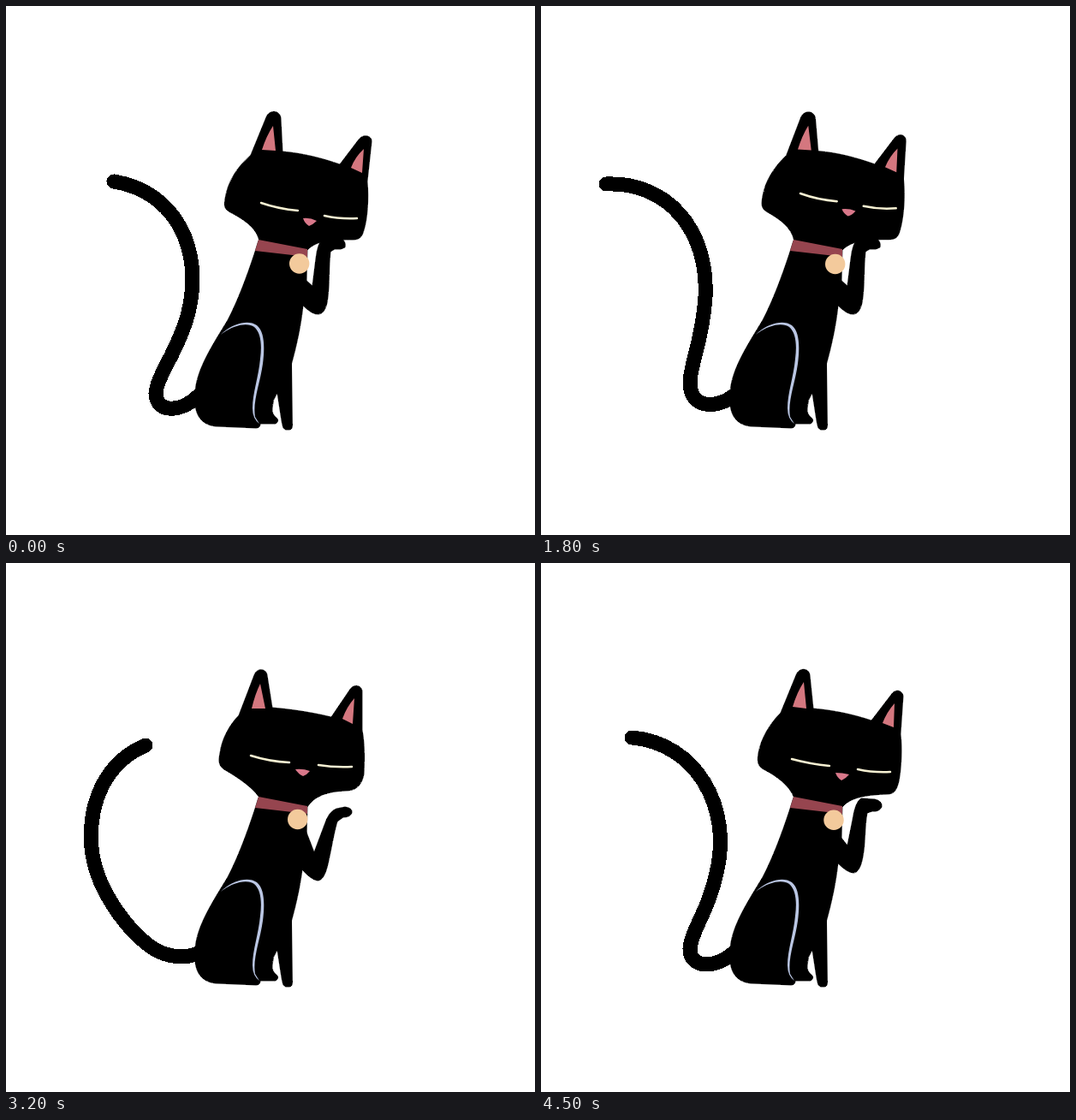
Recreate the animation shown at these times as an HTML page without scripts. Size 618 by 618 pixels, loop 4.6 s.

```html
<!DOCTYPE html>
<html lang="en">
<head>
<meta charset="utf-8">
<title>Cat washing its face</title>
<style>
html, body { margin: 0; width: 100%; height: 100%; overflow: hidden; background: #fff; }
svg { display: block; width: 100vw; height: 100vh; }
.fur { stroke: #000; stroke-width: .8; stroke-linejoin: round; shape-rendering: crispEdges; }

/* Each part holds its own shape for every pose; the keyframes pick the pose. */
.tail {
  fill: none; stroke-width: 17; stroke-linecap: round;
  --rest: path("M224 456C204 475 176 476 175 453C176 432 200 405 212 362C233 283 196 216 126 205");
  --hook: path("M224 456C206 466 183 464 172 441C148 394 172 352 198 302C224 268 220 212 173 202");
  --right: path("M224 456C206 465 181 462 166 441C144 409 138 366 149 317C164 278 192 230 184 207");
  --bow: path("M224 456C206 464 180 460 160 441C140 424 104 380 100 332C96 283 114 234 163 213");
  --bend: path("M224 456C204 470 180 468 172 442C163 412 148 382 126 355C78 302 62 240 126 211");
  --flick: path("M224 456C204 472 172 472 172 440C173 420 179 400 178 365C176 250 98 265 61 211");
  --left: path("M224 456C204 472 172 471 172 439C173 419 182 396 182 358C182 262 105 240 53 210");
  --back: path("M224 456C204 471 174 470 174 440C174 420 189 390 192 340C196 262 148 205 76 208");
  --near: path("M224 456C204 474 174 474 174 451C175 430 196 406 205 362C224 284 180 210 106 204");
  animation: sway 4.6s infinite;
}
.body {
  --rest: path("M295 274L290 290C281 317 271 344 259 367C242 395 222 425 221 452C219 475 226 489 245 491L292 493Q297 493 297 488L315 488Q319 486 317 482Q310 477 311 470Q311 460 317 452L321 478C322 485 323 490 324 493Q326 496 331 495Q335 495 334.5 488L333.5 418C340 395 345 370 347 350L351 322L352 284Z");
  --sit: path("M291 274L287 290C278 317 269 344 258 367C242 395 222 425 221 452C219 475 226 489 245 491L292 493Q297 493 297 488L315 488Q319 486 317 482Q310 477 311 470Q311 460 316 452L320 478C321 485 322 490 323 493Q325 496 331 495Q334 495 334 488L331 418C334 408 344 385 345 350L346 322L349 284Z");
}
.arm {
  --rest: path("M350 320L358 327L362 295Q364 277 370 272L390 270Q398 275 396 282Q392 285 384 284L379 287C377 305 378 325 376 340C375 352 371 360 365 360Q358 361 346 349Z");
  --lift: path("M350 312L360 338L372 306Q377 290 386 287L396 285Q405 286 404 292Q402 297 394 297L387 302C383 315 380 335 376 352C373 365 369 371 364 371Q356 370 345 357Z");
  --reach: path("M348 320L356 360L375 375Q384 390 390 402L396 412Q398 420 390 420Q384 419 380 412L372 402C366 396 362 395 358 392C350 388 347 385 344 380Q343 370 344 345Z");
  --sit: path("M346 320L333 411L340 430Q343 450 343 470L343 484Q344 491 349 490Q354 490 353 484L354 470C355 455 356 440 356 428C355 415 351 395 349 380Q346 360 345 330Z");
  --near: path("M350 320L358 330L364 300Q367 279 374 275L390 276Q399 278 398 285Q395 291 387 290L381 292C378 308 379 328 376 343C374 355 370 362 365 362Q358 362 346 350Z");
  animation: wash 4.6s infinite;
}
.head {
  --rest: path("M296 275C293 258 275 248 262 241C254 237 255 232 256 225C259 205 270 188 286 174L304 130C307 121 320 121 321 131L323 170C347 172 370 178 390 185L412 156C417 149 428 151 427 159L422 205C424 225 422 250 418 262C416 270 413 273 405 273C385 273 365 272 352 285Z");
  --mid: path("M296 275C293 258 277 248 264 241C256 237 257 232 258 225C261 205 272 188 288 174L306 130C309 121 322 121 323 131L325 170C349 172 371 178 391 185L412 156C417 149 428 150 427 158L423 205C425 225 423 250 419 262C417 271 414 274 406 274C386 274 365 272 352 285Z");
  --down: path("M296 275C293 257 277 248 264 242C256 238 257 234 258 227C261 207 273 190 289 175L308 132C311 123 324 123 325 133L326 171C350 173 372 179 392 187L415 160C420 153 431 155 430 163L425 208C427 228 424 252 420 264C418 272 414 275 406 275C386 275 366 273 352 285Z");
  --up: path("M296 275C293 258 277 248 264 240C257 236 258 230 259 222C262 203 272 188 286 174L302 130C305 121 318 121 319 131L323 169C347 171 368 177 389 184L411 154C416 146 425 148 425 156L423 200C425 220 424 245 419 262C417 270 414 272 406 272C385 272 365 272 352 285Z");
  --lift: path("M296 274C288 262 270 250 258 243C248 238 248 232 250 222C252 205 262 188 272 178L290 131C293 122 304 123 305 131L311 169C335 171 360 175 380 180L401 149C406 140 416 143 416 150L416 195C419 210 419 230 418 247C415 262 407 266 397 266C375 267 360 272 352 285Z");
  --sit: path("M292 275C286 262 268 254 245 244C238 240 238 238 239 230C241 212 248 195 253 183L264 134C266 124 278 124 280 133L292 169C315 168 340 169 364 174L383 139C387 130 397 132 398 140L402 185C407 198 412 215 413 235C414 245 412 248 405 250C385 256 358 260 349 285Z");
  --near: path("M296 275C291 260 274 248 260 241C252 237 253 230 254 222C257 205 267 188 280 175L298 131C301 122 313 122 314 131L318 170C342 172 365 177 386 184L409 154C414 146 423 149 423 156L420 200C422 215 421 240 418 255C415 267 412 270 404 270C385 271 363 272 352 285Z");
}
.ears {
  fill: #d4777f;
  --rest: path("M312 140Q304 152 299 168L315 169ZM418 167Q408 176 403 189L416 195Z");
  --mid: path("M315 139Q307 151 301 167L317 168ZM418 166Q408 176 403 189L417 195Z");
  --down: path("M316 142Q308 153 303 169L318 170ZM421 171Q411 180 405 192L419 198Z");
  --up: path("M311 139Q304 151 299 167L315 168ZM415 165Q406 174 401 187L414 193Z");
  --lift: path("M297 141Q291 153 287 170L303 170ZM407 158Q398 168 393 182L405 188Z");
  --sit: path("M273 143Q269 155 268 173L285 172ZM391 149Q382 160 378 173L392 176Z");
  --near: path("M307 139Q299 151 294 168L310 170ZM413 164Q404 174 399 187L412 192Z");
}
.lids {
  fill: none; stroke: #f6f0d2; stroke-width: 2.5; stroke-linecap: round;
  --rest: path("M298 230Q318 237 341 239M372 245Q390 249 410 248");
  --mid: path("M302 228Q322 236 344 238M375 245Q393 249 412 249");
  --down: path("M303 231Q323 239 345 241M376 248Q394 252 414 252");
  --up: path("M303 215Q323 222 346 224M377 229Q395 233 415 231");
  --lift: path("M286 225Q308 232 331 233M365 236Q384 239 404 238");
  --sit: path("M270 219Q293 222 318 222M354 221Q375 222 395 221");
  --near: path("M293 229Q315 235 337 237M370 241Q388 245 408 244");
}
.nose {
  fill: #d9788a;
  --rest: path("M347 248Q355 247 363 251Q359 255 354 257Q349 254 347 248Z");
  --mid: path("M350 248Q357 247 366 251Q361 255 357 257Q352 254 350 248Z");
  --down: path("M350 250Q358 249 366 253Q362 257 357 259Q352 256 350 250Z");
  --up: path("M352 233Q360 232 368 235Q364 240 359 241Q354 238 352 233Z");
  --lift: path("M338 241Q347 240 355 243Q352 247 347 249Q341 246 338 241Z");
  --sit: path("M327 229Q336 229 344 230Q341 235 335 238Q330 235 327 229Z");
  --near: path("M344 245Q352 245 360 247Q356 252 351 254Q346 251 344 245Z");
}
.collar {
  fill: #96454f;
  --rest: path("M295 273L352 284L352 293L291 286Z");
  --sit: path("M291 273L349 283L348 292L287 286Z");
}
.bell {
  fill: #f3ca9c;
  --rest: path("M331 301a11.7 11.7 0 1 0 23.4 0a11.7 11.7 0 1 0 -23.4 0Z");
  --up: path("M332 301.5a11.7 11.7 0 1 0 23.4 0a11.7 11.7 0 1 0 -23.4 0Z");
  --mid: var(--up);
  --down: var(--up);
  --lift: path("M329 299.5a11.7 11.7 0 1 0 23.4 0a11.7 11.7 0 1 0 -23.4 0Z");
  --sit: path("M326 297a11.7 11.7 0 1 0 23.4 0a11.7 11.7 0 1 0 -23.4 0Z");
  --near: path("M330.3 300.3a11.7 11.7 0 1 0 23.4 0a11.7 11.7 0 1 0 -23.4 0Z");
}
.eyes {
  fill: #f9f3d6;
  --shut: path("M280 222Q290 222 298 224L306 226L306 227ZM318 227L318 228L327 228ZM361 231Q372 231 380 232L380 233ZM393 232L393 233L402 232Z");
  --open: path("M269 221Q280 205 288 205L295 208L296 222ZM311 216L308 223L318 222ZM354 222Q363 211 372 210L373 222ZM388 209L387 222L395 220Z");
  animation: look 4.6s infinite, show 4.6s step-end infinite;
}
.line { fill: #bac6e3; }
.act { animation: act 4.6s infinite; }
.lids.act { animation: act 4.6s infinite, hide 4.6s step-end infinite; }

/* Motion runs at ten drawings a second, so each stretch is stepped. */
@keyframes sway {
  0%, 100% { d: var(--rest); animation-timing-function: steps(3); }
  6.521% { d: var(--hook); animation-timing-function: steps(3); }
  13.043% { d: var(--right); animation-timing-function: steps(3); }
  19.565% { d: var(--bow); animation-timing-function: steps(3); }
  26.086% { d: var(--bend); animation-timing-function: steps(3); }
  32.608% { d: var(--flick); animation-timing-function: steps(1); }
  34.782% { d: var(--left); animation-timing-function: steps(2); }
  39.13% { d: var(--back); animation-timing-function: steps(2); }
  43.478% { d: var(--near); animation-timing-function: steps(1); }
  45.652% { d: var(--rest); animation-timing-function: steps(4); }
  54.347% { d: var(--hook); animation-timing-function: steps(3); }
  60.869% { d: var(--right); animation-timing-function: steps(4); }
  69.565% { d: var(--bow); animation-timing-function: steps(4); }
  78.26% { d: var(--bend); animation-timing-function: steps(4); }
  86.956% { d: var(--flick); animation-timing-function: steps(1); }
  89.13% { d: var(--left); animation-timing-function: steps(2); }
  93.478% { d: var(--back); animation-timing-function: steps(2); }
  97.826% { d: var(--near); animation-timing-function: steps(1); }
}
@keyframes act {
  0%, 100% { d: var(--rest); animation-timing-function: steps(2); }
  4.347% { d: var(--down, var(--rest)); animation-timing-function: steps(4); }
  13.043% { d: var(--up, var(--rest)); animation-timing-function: steps(3); }
  19.565% { d: var(--down, var(--rest)); animation-timing-function: steps(3); }
  26.086% { d: var(--up, var(--rest)); animation-timing-function: steps(3); }
  32.608% { d: var(--down, var(--rest)); animation-timing-function: steps(2); }
  36.956% { d: var(--up, var(--rest)); animation-timing-function: steps(4); }
  45.652% { d: var(--down, var(--rest)); animation-timing-function: steps(2); }
  50% { d: var(--up, var(--rest)); animation-timing-function: steps(2); }
  54.347% { d: var(--mid, var(--rest)); animation-timing-function: steps(2); }
  58.695%, 65.217% { d: var(--down, var(--rest)); animation-timing-function: steps(2); }
  69.565% { d: var(--lift, var(--rest)); animation-timing-function: steps(5); }
  80.434%, 89.13% { d: var(--sit); animation-timing-function: steps(2); }
  93.478% { d: var(--lift, var(--rest)); animation-timing-function: steps(2); }
  97.826% { d: var(--near, var(--rest)); animation-timing-function: steps(1); }
}
@keyframes wash {
  0%, 65.217%, 100% { d: var(--rest); animation-timing-function: steps(2); }
  69.565% { d: var(--lift); animation-timing-function: steps(2); }
  73.913% { d: var(--reach); animation-timing-function: steps(3); }
  80.434%, 89.13% { d: var(--sit); animation-timing-function: steps(1); }
  91.304% { d: var(--reach); animation-timing-function: steps(1); }
  93.478% { d: var(--lift); animation-timing-function: steps(2); }
  97.826% { d: var(--near); animation-timing-function: steps(1); }
}
@keyframes look {
  0%, 73.913%, 93.478%, 100% { d: var(--shut); animation-timing-function: steps(3); }
  80.434%, 89.13% { d: var(--open); animation-timing-function: steps(2); }
}
@keyframes show { 0%, 93.478%, 100% { opacity: 0; } 73.913% { opacity: 1; } }
@keyframes hide { 0%, 93.478%, 100% { opacity: 1; } 73.913% { opacity: 0; } }
</style>
</head>
<body>
<svg viewBox="0 0 618 618">
  <path class="fur tail"/>
  <path class="fur body act"/>
  <path class="fur arm"/>
  <path class="line" d="M251 384C264 370 284 366 293 373C303 381 302 402 300 418C297 440 288 462 291 480L296 488Q288 482 288 470C288 452 295 434 297 412C299 396 298 382 290 375C282 369 264 373 251 384Z"/>
  <path class="fur head act"/>
  <path class="ears act"/>
  <path class="lids act"/>
  <path class="eyes"/>
  <path class="nose act"/>
  <path class="collar act"/>
  <path class="bell act"/>
</svg>
</body>
</html>
```
